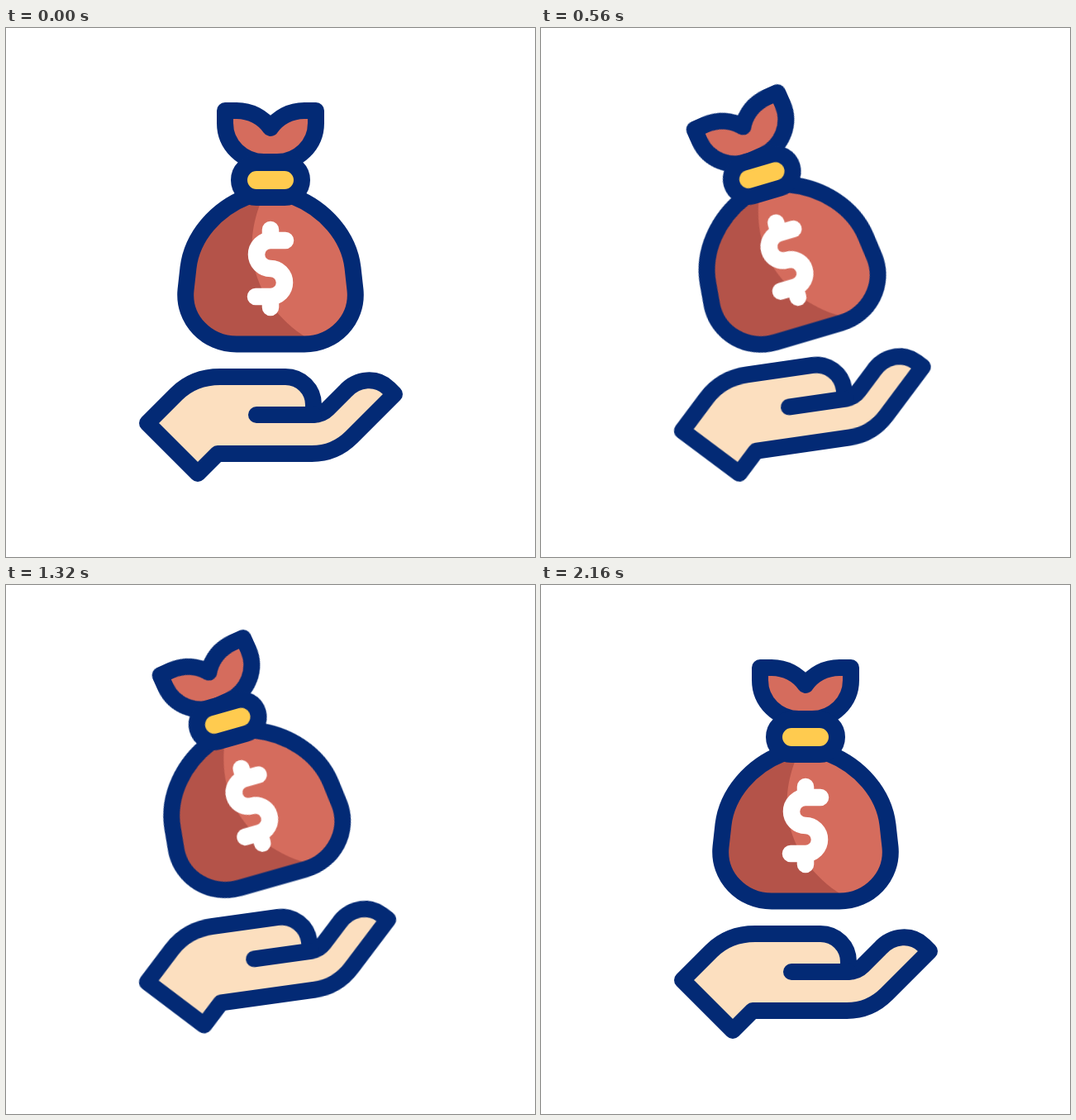
These frames come from a looping animation (640x640 px, 2.4 s). An HTML page without scripts:

```html
<!DOCTYPE html>
<html lang="en">
<head>
<meta charset="utf-8">
<title>Money bag tossed on a hand</title>
<style>
  html, body { margin: 0; width: 100%; height: 100%; overflow: hidden; background: #fff; }
  svg { display: block; width: 100vw; height: 100vh; }

  .line { stroke: #032a75; stroke-width: 20; stroke-linecap: round; stroke-linejoin: round; }
  .none { fill: none; }
  .red { fill: #d56c5d; }
  .dark { fill: #b45349; }
  .gold { fill: #ffcb4f; }
  .skin { fill: #fcdfbf; }
  .sign { fill: none; stroke: #fff; stroke-width: 20.5; stroke-linecap: round; }
  .ray { fill: none; stroke: #ffcb4f; stroke-width: 20; stroke-linecap: round; }

  .bob, .sway, .hop, .tilt, .flap {
    animation: 2.4s cubic-bezier(.3333, 0, .6667, 1) infinite;
  }
  .bob { animation-name: bob; }
  .sway { animation-name: sway; transform-origin: 195px 481px; }
  .hop { animation-name: hop; }
  .tilt { animation-name: tilt; transform-origin: 320px 249px; }
  .flap { animation-name: flap; transform-origin: 320px 162px; }
  .ray { animation: shoot 2.4s linear infinite, show 2.4s step-end infinite; }

  /* hand and bag together, up and down */
  @keyframes bob {
    0%, 90%, 100% { transform: translateY(0); }
    14.583% { transform: translateY(28px); }
    29.167% { transform: translateY(-33px); }
    42.917% { transform: translateY(66px); }
    57.917% { transform: translateY(-27px); }
    75.625% { transform: translateY(26px); }
  }
  /* turn at the wrist, lifted so the palm centre stays put */
  @keyframes sway {
    0%, 90%, 100% { transform: translateY(0) rotate(0deg); }
    16.875% { transform: translateY(39.7px) rotate(-18.5deg); }
    35% { transform: translateY(-35.5px) rotate(16.5deg); }
    54.167% { transform: translateY(17.4px) rotate(-8deg); }
    73.958% { transform: translateY(-13.1px) rotate(6deg); }
  }
  /* bag relative to the palm */
  @keyframes hop {
    0%, 90%, 100% { transform: translateY(0); }
    10.833%, 16.667% { transform: translateY(35px); }
    29.167% { transform: translateY(-26px); }
    40%, 44.167% { transform: translateY(40px); }
    60% { transform: translateY(-20.5px); }
    73.75% { transform: translateY(16px); }
  }
  @keyframes tilt {
    0%, 90%, 100% { transform: rotate(0deg); }
    16.875% { transform: rotate(-18.5deg); }
    35% { transform: rotate(16.5deg); }
    54.167% { transform: rotate(-8deg); }
    73.958% { transform: rotate(6deg); }
  }
  /* loose top swings further than the bag */
  @keyframes flap {
    0%, 90%, 100% { transform: rotate(0deg); }
    16.875% { transform: rotate(-19deg); }
    35% { transform: rotate(20deg); }
    54.167% { transform: rotate(-8.5deg); }
    73.958% { transform: rotate(5.5deg); }
  }
  @keyframes shoot {
    0%, 36% { stroke-dasharray: 0 300; stroke-dashoffset: 0; }
    38.333% { stroke-dasharray: 45 300; stroke-dashoffset: -6; }
    40.833% { stroke-dasharray: 47 300; stroke-dashoffset: -38; }
    45% { stroke-dasharray: 20 300; stroke-dashoffset: -80; }
    47%, 100% { stroke-dasharray: 0 300; stroke-dashoffset: -100; }
  }
  @keyframes show {
    0%, 47%, 100% { stroke-opacity: 0; }
    36.2% { stroke-opacity: 1; }
  }
</style>
</head>
<body>
<svg viewBox="0 0 640 640">
  <g>
    <path class="ray" pathLength="100" d="M215 191H147"/>
    <path class="ray" pathLength="100" d="M223.500 153L158.500 90.500"/>
    <path class="ray" pathLength="100" d="M261 141L269.200 73"/>
  </g>

  <g class="bob"><g class="sway">
    <g class="hop"><g class="tilt">
      <path class="flap red line" d="M265 100H279C296 100 311 108 320 121C329 108 344 100 361 100H375V115C375 142 353 162 328 162H312C287 162 265 142 265 115Z"/>
      <path class="red" d="M292 204C254 219 225 252 220.500 290L217.500 317C214 353 243 382.500 279 382.500H361C397 382.500 426 353 422.500 317L419.500 290C415 252 386 219 348 204Z"/>
      <path class="dark" d="M292 204C254 219 225 252 220.500 290L217.500 317C214 353 243 382.500 279 382.500H378C340 364 313 333 302 296C294 266 297 236 311 204Z"/>
      <path class="none line" d="M292 204C254 219 225 252 220.500 290L217.500 317C214 353 243 382.500 279 382.500H361C397 382.500 426 353 422.500 317L419.500 290C415 252 386 219 348 204"/>
      <rect class="gold line" x="282" y="163" width="76" height="42" rx="21"/>
      <path class="sign" d="M338 257H320A17 17 0 0 0 320 291A17 17 0 0 1 320 325H302M320 244V257M320 325V338"/>
    </g></g>

    <path class="skin line" d="M171 478L206 443C220 429 239 422 259 422H338C357 422 372 437 372 456V468C380 468 384 466 389 461L410 440C425 423 449 422 463 436L470 443L418 495C405 508 388 515 370 515H256L232 539Z"/>
    <path class="none line" d="M303 468H372"/>
  </g></g>
</svg>
</body>
</html>
```
